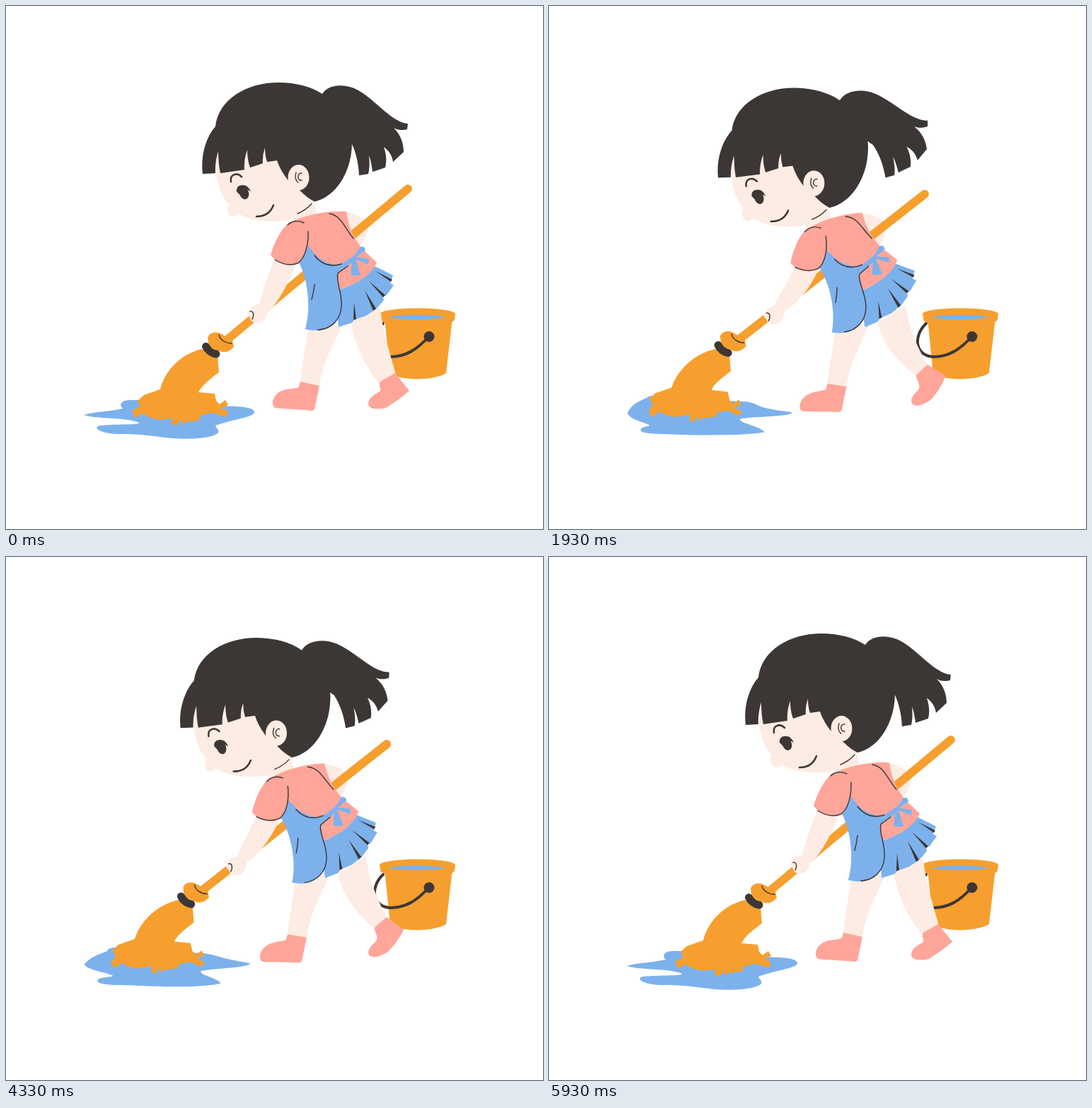
Animation of 759x738 px, one loop 6010 ms. Source, as an HTML page:

```html
<!DOCTYPE html>
<html lang="en">
<head>
<meta charset="utf-8">
<title>Mopping</title>
<style>
  html, body { margin: 0; width: 100%; height: 100%; overflow: hidden; background: #fff; }
  svg { display: block; width: 100%; height: 100%; }
  .hair { fill: #3c3735; }
  .skin { fill: #fdece3; }
  .pink { fill: #ffa599; }
  .blue { fill: #7db1ec; }
  .gold { fill: #f69f2e; }
  .line { fill: none; stroke: #3c3735; stroke-width: 1.4; stroke-linecap: round; stroke-linejoin: round; }
  .pole { fill: none; stroke: #f69f2e; stroke-width: 12; stroke-linecap: round; }
  .bold { stroke-width: 2.5; }
  .wire { stroke-width: 4; }
  .band { stroke-width: 11; }
</style>
</head>
<body>
<svg viewBox="0 0 759 738">
  <path class="blue"
    d="M110 577C125 572 145 573 165 568C158 561 165 555 178 556C200 556 240 558 290 564C310 565 350 563 351 573C351 580 325 582 296 592C297 596 303 599 299 603C290 610 260 612 235 610C205 607 195 604 160 604C135 604 124 596 130 593C140 589 190 592 188 588C170 580 125 583 110 577Z"
    data-to="M111 574C113 562 121 554 130 550C136 548 142 547 150 549C180 555 240 556 278 557C300 562 270 567 341 573C343 580 285 578 264 580C260 587 298 591 306 601C290 602 260 604 235 604C205 606 190 605 160 604C138 604 127 603 130 598C130 594 133 594 130 592C122 588 112 584 111 574Z"/>

  <path class="gold" d="M535 440L543 519C560 529 605 529 622 518L631 440Z"/>
  <path class="gold" d="M528 434C535 424 628 424 635 434L634 442C633 447 626 446 620 445C590 441 570 441 545 446C536 448 529 446 529 441Z"/>
  <path class="blue" d="M541 439C552 434.500 610 434.500 622 439C610 443 552 443 541 439Z"/>
  <path class="line wire" d="M533 448C514 466 517 495 545 495C565 494 580 486 598 466"/>
  <circle class="hair" cx="598" cy="466.500" r="7.500"/>

  <path class="skin"
    d="M487 445C493 480 508 508 527 533L551 520C543 490 532 460 529 425Z"
    data-to="M459 448C467 480 492 503 518 520L532 505C516 480 502 455 498 420Z"/>
  <path class="pink"
    d="M550 518L570 543C560 552 548 560 537 567C525 570 513 569 512 562C512 552 522 548 528 544C532 540 525 536 529 530Z"
    data-to="M531 503L558 516C556 528 550 540 542 551C534 560 518 567 513 560C509 552 518 546 521 540C524 533 519 527 516 519Z"/>

  <g data-move="leg">
    <path class="skin" d="M428 450C424 480 418 505 416 532L443 537C446 505 462 480 476 448Z"/>
    <path class="pink" d="M416 530L443 536L436 569Q435 571 432 571C415 569 395 569 380 567C374 562 377 551 386 545C398 538 412 541 414 537Z"/>
  </g>

  <path class="skin" data-move="torso" d="M476 291C500 292 512 304 511 316C510 328 503 338 495 342L484 320Z"/>
  <path class="skin" data-move="head" d="M400 270H434L441 305H404Z"/>

  <path class="gold"
    d="M277 484C250 490 225 512 218 541L195 549L186 557L190 565L178 571L183 581L192 575L205 581L216 584L236 582L233 588L241 592L247 584L251 591L254 587L273 585L275 578L290 574L303 577L311 580L314 571L304 568L314 563L310 556L302 562L297 557L295 547L272 545C277 535 290 525 301 517L299 493Z"
    data-to="M224 484C197 490 171 512 162 538L139 546L131 553L136 563L131 572L137 580L147 572L158 577L169 579L190 575L190 583L196 586L200 578L203 584L207 580L226 578L228 573L244 570L254 576L260 577L262 572L251 567L261 562L258 555L250 561L245 556L242 544L219 541C222 533 235 523 246 515L244 492Z"/>
  <g data-move="pole">
    <path class="pole" d="M568 258L310 473"/>
    <path class="gold" d="M285 468C288 459 299 459 305 463L320 472L322 481C316 488 309 490 302 487L287 481Z"/>
    <path class="line" d="M301 464C303 472 311 476 319 476"/>
    <path class="line band" d="M282.500 480.500C286 487 291 490 297 491"/>
  </g>

  <path class="skin"
    d="M379 358C370 382 363 400 358 421C350 421 343 425 341 433C341 437 345 437 346 443C349 448 359 448 363 444C367 441 369 436 371 430C385 420 402 385 412 360Z"
    data-to="M339 370C330 392 317 408 308 424C302 426 296 430 294 437C294 441 298 441 300 446C303 451 313 451 317 447C321 444 322 437 324 431C345 418 364 397 374 372Z"/>
  <path class="line"
    d="M345 431C350 430 351 436 348 442"
    data-to="M298 434C303 433 304 439 301 445"/>

  <g data-move="torso">
    <path class="blue" d="M466 402C490 395 510 382 521 367L547 380L543 391L548 394L538 408L533 410L534 415L523 428L518 431L509 437L492 443L489 447L470 453Z"/>
    <path class="hair" d="M522 374L546 386L544 389ZM513 388L536 408L533 411ZM507 401L523 427L519 430ZM492 418L495 442L491 443Z"/>
    <path class="pink" d="M400 306C420 296 452 288 481 290C484 308 488 322 503 342L524 362C520 372 510 381 498 389L468 402L425 360C405 368 385 366 374 351C380 332 388 316 400 306Z"/>
    <path class="blue" d="M427 338C440 358 458 368 474 364L492 352L495 357L483 367L469 377C466 390 476 405 474 425C472 445 458 457 441 458Q432 458 423 456C432 425 426 385 414 362Q423 352 427 338Z"/>
    <path class="blue" d="M490 356L501 340Q507 338 508 345L495 354L513 357L512 365L494 357L501 380Q494 382 487 379Z"/>
    <path class="line" d="M398 309C404 303 413 302 421 306M427 318C428 340 421 358 412 363C402 367 390 364 380 358M457 293C473 295 478 312 491 328M436 352C448 367 462 368 474 364M483 367L469 377C466 390 476 405 474 425C472 445 458 456 441 457M436 393Q435 404 432 414"/>
  </g>

  <g data-move="head">
    <path class="skin" d="M296 225C297 248 304 268 315 280C311 286 314 297 321 297Q326 297 329 293C345 303 370 306 395 303C412 300 424 290 432 275L425 200H300Z"/>
    <path class="hair" data-move="tail" d="M447 124C456 110 480 109 498 119C522 132 545 164 568 166L567 174C560 176 553 175 548 172C558 182 562 194 562 206L547 220C546 211 541 204 534 199C538 210 538 220 536 228L518 234C517 226 516 218 513 211C514 220 514 229 512 237L499 239C498 220 494 204 487 191L440 150Z"/>
    <path class="hair" d="M278 237C275 214 281 187 296 170C300 132 340 108 385 108C410 108 432 114 447 124C475 140 490 165 489 193C489 235 465 270 436 276C428 272 422 267 416 261L398 245C391 236 386 227 383 218L369 220Q366 211 366 200Q362 211 363 222L345 228Q341 217 341 203Q336 217 337 231L303 236Q300 222 300 205Q295 221 296 236Z"/>
    <ellipse class="skin" cx="413.500" cy="242" rx="15" ry="18"/>
    <path class="line" d="M410 235C408 241 409 246 413 249M418 236C411 235 411 247 418 246"/>
    <path class="line bold" d="M318 248C316 238 326 234 333 241"/>
    <ellipse class="hair" cx="336.500" cy="264" rx="6.500" ry="9" transform="rotate(-18 336.500 264)"/>
    <path class="hair" d="M326 262C325 253 333 251 340 254Q344 257 346 262Q341 258 338 260L330 266Z"/>
    <path class="line bold" d="M354 297Q372 297 378 281"/>
    <path class="line" d="M412 293Q424 288 432 279"/>
  </g>
</svg>
<script>
  const LOOP = 6010, STEPS = 120;

  // at: anchor, by: anchor shift, m: change of the linear part [a, b, c, d]
  const MOVES = {
    torso: { at: [423, 456], by: [-29, 6], m: [0, -.125, .113, -.02] },
    head: { at: [425, 285], by: [-50, 10.5], m: [0, .026, -.026, 0] },
    tail: { at: [447, 124], by: [0, 2], m: [-.015, -.175, .175, -.015] },
    pole: { at: [305, 470], by: [-54, -1.5], m: [0, .041, -.036, 0] },
    leg: { at: [416, 570], by: [-28, 3.5], m: [0, -.07, 0, 0] }
  };

  const numbers = d => d.match(/-?[\d.]+/g).map(Number);

  const morphs = [...document.querySelectorAll('[data-to]')].map(el => {
    const d = el.getAttribute('d');
    return { el, shape: d, from: numbers(d), to: numbers(el.dataset.to) };
  });
  const movers = [...document.querySelectorAll('[data-move]')].map(el => ({ el, ...MOVES[el.dataset.move] }));

  function pose(v) {
    for (const { el, at: [x, y], by, m: [a, b, c, d] } of movers) {
      const e = v * (by[0] - a * x - c * y);
      const f = v * (by[1] - b * x - d * y);
      el.setAttribute('transform', `matrix(${1 + v * a} ${v * b} ${v * c} ${1 + v * d} ${e} ${f})`);
    }
    for (const { el, shape, from, to } of morphs) {
      let i = 0;
      el.setAttribute('d', shape.replace(/-?[\d.]+/g, () => {
        const n = from[i] + (to[i] - from[i]) * v;
        i++;
        return n.toFixed(2);
      }));
    }
  }

  // Steps alternate between 30 and 70 ms.
  function draw(now) {
    const t = now % LOOP;
    const step = Math.min(STEPS - 1, 2 * Math.floor(t / 100) + (t % 100 >= 30 ? 1 : 0));
    pose(Math.sin(Math.PI * step / STEPS) ** 1.9 / .923);
  }

  const start = performance.now();
  function tick() {
    draw(performance.now() - start);
    requestAnimationFrame(tick);
  }
  tick();
</script>
</body>
</html>
```
